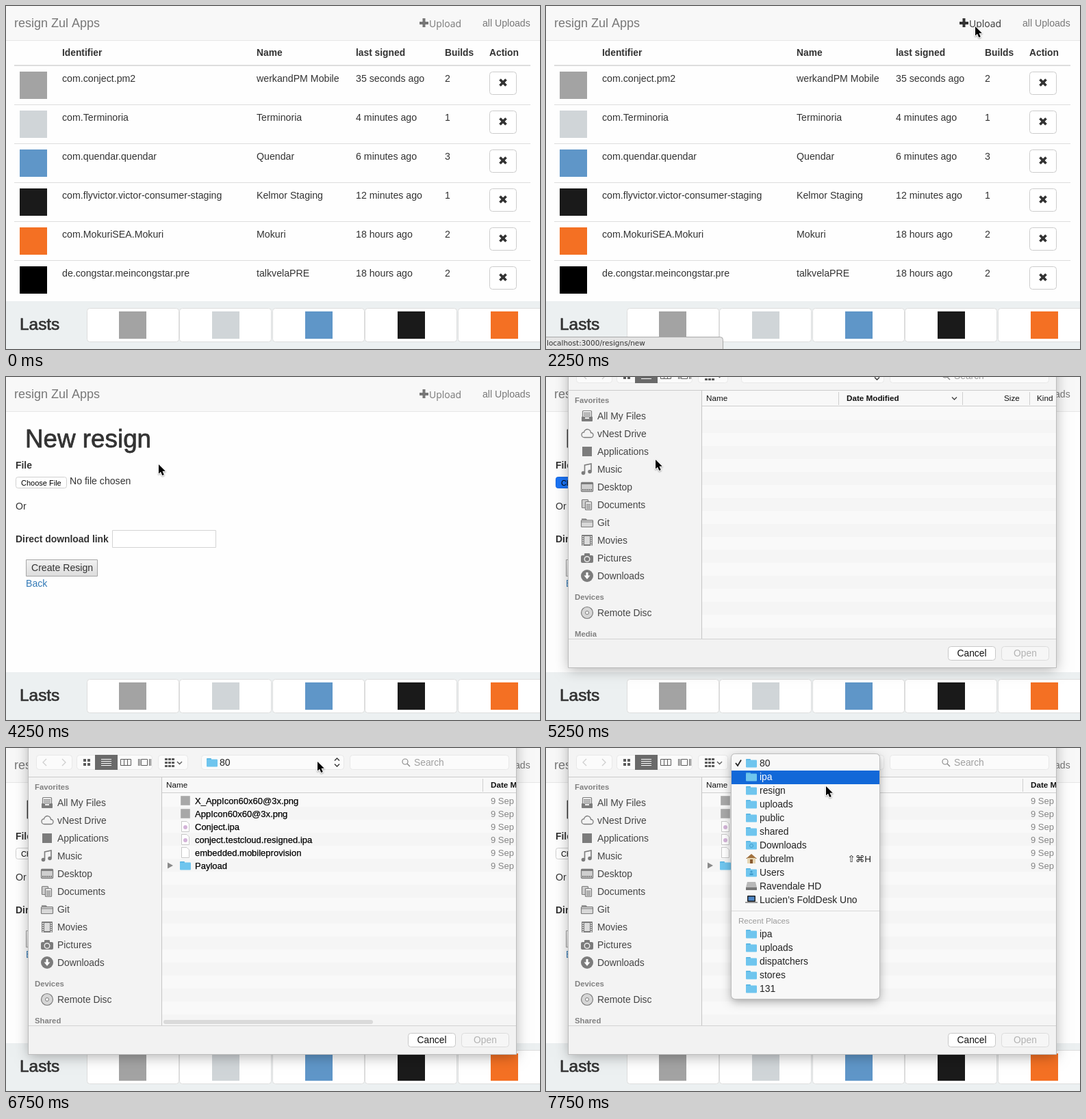
Write an HTML page with a canvas that moves like this. It is 780 by 502 pixels and loops after 8000 ms.

```html
<!DOCTYPE html>
<html lang="en">
<head>
<meta charset="utf-8">
<title>resign Zul Apps</title>
<style>
html, body { margin: 0; width: 100%; height: 100%; overflow: hidden; background: #fefefe; }
canvas { display: block; }
</style>
</head>
<body>
<canvas id="stage" width="780" height="502"></canvas>
<script>
const c = document.getElementById('stage').getContext('2d');
const LOOP = 8000, STEP = 250;
const SANS = '"Liberation Sans", Arial, sans-serif';

// ---- drawing helpers ----
function text(s, x, y, size, color, weight = 400, family = SANS, align = 'left') {
  c.font = `${weight} ${size}px ${family}`;
  c.fillStyle = color;
  c.textAlign = align;
  c.fillText(s, x, y);
}
function medium(s, x, y, size, color, extra) {
  text(s, x, y, size, color);
  c.strokeStyle = color;
  c.lineWidth = extra;
  c.lineJoin = 'round';
  c.strokeText(s, x, y);
}
function rect(x, y, w, h, color) {
  c.fillStyle = color;
  c.fillRect(x, y, w, h);
}
function box(x, y, w, h, r, fill, stroke, width = 1) {
  c.beginPath();
  c.roundRect(x, y, w, h, r);
  if (fill) { c.fillStyle = fill; c.fill(); }
  if (stroke) { c.strokeStyle = stroke; c.lineWidth = width; c.stroke(); }
}
function line(points, color, width = 1) {
  c.beginPath();
  for (let i = 0; i < points.length; i += 2) c.lineTo(points[i], points[i + 1]);
  c.strokeStyle = color;
  c.lineWidth = width;
  c.lineJoin = 'miter';
  c.stroke();
}
function poly(points, fill) {
  c.beginPath();
  for (let i = 0; i < points.length; i += 2) c.lineTo(points[i], points[i + 1]);
  c.closePath();
  c.fillStyle = fill;
  c.fill();
}
function disc(x, y, r, fill, stroke, width = 1) {
  c.beginPath();
  c.arc(x, y, r, 0, Math.PI * 2);
  if (fill) { c.fillStyle = fill; c.fill(); }
  if (stroke) { c.strokeStyle = stroke; c.lineWidth = width; c.stroke(); }
}
function shadow(color, blur, dy) {
  c.shadowColor = color;
  c.shadowBlur = blur;
  c.shadowOffsetY = dy;
}
const noShadow = () => shadow('transparent', 0, 0);

// ---- page ----
const apps = [
  ['com.conject.pm2', 'werkandPM Mobile', '35 seconds ago', '2', '#a3a3a3'],
  ['com.Terminoria', 'Terminoria', '4 minutes ago', '1', '#d0d5d8'],
  ['com.quendar.quendar', 'Quendar', '6 minutes ago', '3', '#5f96c8'],
  ['com.flyvictor.victor-consumer-staging', 'Kelmor Staging', '12 minutes ago', '1', '#1a1a1a'],
  ['com.MokuriSEA.Mokuri', 'Mokuri', '18 hours ago', '2', '#f47023'],
  ['de.congstar.meincongstar.pre', 'talkvelaPRE', '18 hours ago', '2', '#000']
];
const cols = [82, 366, 511, 641, 706];

function navbar(hover) {
  rect(0, 0, 780, 50, '#f8f8f8');
  rect(0, 50, 780, 1, '#e7e7e7');
  text('resign Zul Apps', 12, 31, 18, '#777');
  const ink = hover ? '#333' : '#777';
  rect(604, 23, 13, 4, ink);
  rect(608.5, 18, 4, 13, ink);
  text('Upload', 618, 31, 14, ink, 400, '"Open Sans", sans-serif');
  text('all Uploads', 696, 30, 14.1, '#777');
}

function table() {
  ['Identifier', 'Name', 'last signed', 'Builds', 'Action'].forEach((s, i) =>
    text(s, cols[i], 73, 13.8, '#333', 700));
  rect(12, 86, 754, 2, '#ddd');
  apps.forEach((app, i) => {
    const y = 87 + i * 57;
    if (i) rect(12, y, 754, 1, '#ddd');
    rect(20, y + 9, 40, 40, app[4]);
    for (let k = 0; k < 4; k++) text(app[k], cols[k], y + 24, 14.2, '#333');
    box(706.5, y + 9.5, 39, 33, 4, '#fff', '#ccc');
    line([721.5, y + 20.5, 730.5, y + 29.5], '#333', 3.8);
    line([730.5, y + 20.5, 721.5, y + 29.5], '#333', 3.8);
  });
}

function form(pressed) {
  medium('New resign', 28, 103, 36.8, '#333', 0.8);
  text('File', 14, 134, 13.9, '#333', 700);
  box(14.5, 146.5, 74, 16, 3, pressed ? '#1a73f5' : '#fff', pressed ? '#1667e0' : '#d0d0d0');
  text('Choose File', 22, 159, 11, '#000');
  text('No file chosen', 93, 157, 14.1, '#333');
  text('Or', 14, 194, 14.1, '#333');
  text('Direct download link', 14, 242, 13.9, '#333', 700);
  box(155.5, 224.5, 151, 25, 0, '#fff', '#d4d4d4');
  const g = c.createLinearGradient(0, 267, 0, 292);
  g.addColorStop(0, '#f2f2f2');
  g.addColorStop(1, '#dcdcdc');
  box(29.5, 267.5, 104, 24, 0, g, '#a6a6a6');
  text('Create Resign', 37, 284, 14.1, '#333');
  text('Back', 29, 307, 14.1, '#337ab7');
}

function footer() {
  rect(0, 432, 780, 70, '#ecf0f1');
  medium('Lasts', 20, 474, 24.4, '#333', 0.7);
  for (let i = 0; i < 5; i++) {
    box(118.5 + Math.floor(i * 135.5), 442.5, 134, 49, 4, '#fff', '#ddd');
    rect(165 + Math.round(i * 135.75), 447, 40, 40, apps[i][4]);
  }
}

function statusBar() {
  box(-4.5, 484.5, 263, 24, 4, '#e4e4e4', '#a8a8a8');
  text('localhost:3000/resigns/new', 1, 497, 10.5, '#333', 400, '"DejaVu Sans", sans-serif');
}

// ---- file dialog ----
const G = '#7c7c7c';

function folder(x, y, fill = '#6fc5ee', top = '#55b3e2') {
  box(x, y - 6, 7, 5, 1, top);
  box(x, y - 4.5, 16, 11, 1, fill);
}
function page(x, y) {
  poly([x + 2, y - 8, x + 10, y - 8, x + 14, y - 4, x + 14, y + 8, x + 2, y + 8], '#fff');
  line([x + 2.5, y - 7.5, x + 10, y - 7.5, x + 13.5, y - 4, x + 13.5, y + 7.5, x + 2.5, y + 7.5, x + 2.5, y - 8], '#c8c8c8');
}

// sidebar icons, centred on (60, y)
const sideIcons = {
  tray(y) {
    box(53.5, y - 7.5, 13, 10, 1, '#f3f3f3', G, 1.2);
    for (let k = -5; k < 1; k += 2) rect(55, y + k, 10, 1, G);
    box(52, y + 1, 16, 7, 1, G);
    rect(57, y + 2, 6, 2, '#f3f3f3');
  },
  cloud(y) {
    c.beginPath();
    c.arc(56, y + 1.5, 4, Math.PI / 2, Math.PI * 1.45);
    c.arc(60.5, y - 1.5, 5, Math.PI * 1.05, Math.PI * 1.85);
    c.arc(65.5, y + 2, 3.5, Math.PI * 1.5, Math.PI / 2);
    c.closePath();
    c.strokeStyle = G; c.lineWidth = 1.3; c.stroke();
  },
  square(y) { rect(53, y - 7, 14, 14, G); },
  note(y) {
    line([56.5, y + 5, 56.5, y - 6, 66, y - 8, 66, y + 3], G, 1.6);
    disc(54.5, y + 5.5, 2.8, G);
    disc(64, y + 3.5, 2.8, G);
  },
  desk(y) {
    box(51.5, y - 6.5, 17, 13, 1, '#cfcfcf', G, 1.3);
    rect(52, y - 6, 16, 2, G);
    for (let x = 53; x < 67; x += 3) rect(x, y + 3, 2, 2, G);
  },
  docs(y) {
    box(52.5, y - 7.5, 9, 12, 1, '#cfcfcf', G, 1.2);
    box(57.5, y - 4.5, 9, 12, 1, '#e4e4e4', G, 1.2);
    for (let k = -1; k < 6; k += 2) rect(59, y + k, 6, 1, G);
  },
  folder(y) {
    line([52, y - 5, 58, y - 5, 60, y - 3], G, 1.4);
    box(51.5, y - 3.5, 17, 10, 1, '#d8d8d8', G, 1.2);
    rect(52, y - 1.5, 16, 1, G);
  },
  film(y) {
    box(52, y - 8, 16, 16, 1, G);
    rect(56, y - 6, 8, 12, '#dcdcdc');
    for (let k = -6; k < 7; k += 3) { rect(53, y + k, 2, 1.5, '#eee'); rect(65, y + k, 2, 1.5, '#eee'); }
  },
  camera(y) {
    box(51, y - 4, 18, 11, 2, G);
    box(56, y - 7, 8, 5, 1, G);
    disc(60, y + 1.5, 3.8, G, '#eee', 1.4);
  },
  down(y) {
    disc(60, y, 9, G);
    rect(58.5, y - 5, 3, 5, '#fff');
    poly([55.5, y - 0.5, 64.5, y - 0.5, 60, y + 5], '#fff');
  },
  cd(y) {
    disc(60, y, 8.5, '#d6d6d6', G, 1.2);
    disc(60, y, 2.5, '#f4f4f4', G, 1);
  }
};
const places = [
  ['All My Files', 'tray'], ['vNest Drive', 'cloud'], ['Applications', 'square'], ['Music', 'note'],
  ['Desktop', 'desk'], ['Documents', 'docs'], ['Git', 'folder'], ['Movies', 'film'],
  ['Pictures', 'camera'], ['Downloads', 'down']
];
const files = ['X_AppIcon60x60@3x.png', 'AppIcon60x60@3x.png', 'Conject.ipa',
  'conject.testcloud.resigned.ipa', 'embedded.mobileprovision', 'Payload'];

function sidebar(loaded) {
  rect(33, 43, 194, 363, '#f3f3f3');
  rect(227, 43, 1, 363, '#c6c6c6');
  const head = (s, y) => text(s, 42, y + 4, 11.3, '#808080', 700);
  const item = (s, icon, y) => {
    sideIcons[icon](y);
    text(s, 75, y + 5, 13.9, '#454545');
  };
  head('Favorites', 57);
  places.forEach(([s, icon], i) => item(s, icon, 80 + i * 26));
  head('Devices', 345);
  item('Remote Disc', 'cd', 368);
  head(loaded ? 'Shared' : 'Media', 399);
}

function toolbar(loaded) {
  const ink = '#5c5c5c';
  const button = (x, w) => box(x + 0.5, 10.5, w, 21, 4, '#fbfbfb', '#e8e8e8');
  button(44, 52);
  line([59, 16, 54, 21, 59, 26], '#cfcfcf', 1.3);
  line([82, 16, 87, 21, 82, 26], '#cfcfcf', 1.3);
  button(103, 110);
  for (let i = 0; i < 4; i++) rect(113 + (i % 2) * 6, 16 + (i >> 1) * 6, 4, 4, ink);
  rect(130, 10, 33, 22, '#6a6a6a');
  for (let k = 0; k < 4; k++) rect(139, 16 + k * 3, 15, 1, '#fff');
  box(167.5, 16.5, 15, 9, 0, null, ink);
  rect(172, 17, 1, 9, ink);
  rect(177, 17, 1, 9, ink);
  box(197.5, 16.5, 9, 9, 0, null, ink);
  [193, 195, 209, 211].forEach(x => rect(x, 16, 1, 10, ink));
  button(222, 43);
  for (let i = 0; i < 9; i++) rect(232 + (i % 3) * 5, 15 + Math.floor(i / 3) * 5, 4, 3, ink);
  line([250, 20, 253.5, 23.5, 257, 20], ink, 1.4);
  button(285, 208);
  if (loaded) {
    folder(293, 21);
    text('80', 312, 26, 14, '#222');
  }
  line([480, 18.5, 483.5, 15, 487, 18.5], '#333', 1.4);
  line([480, 23.5, 483.5, 27, 487, 23.5], '#333', 1.4);
  button(502, 232);
  disc(583, 20, 4, null, '#8a8a8a', 1.2);
  line([586, 23, 590, 27], '#8a8a8a', 1.4);
  text('Search', 596, 26, 13.8, '#a0a0a0');
}

function fileList(loaded, scrollbar) {
  rect(228, 43, 517, 363, '#f9f9f9');
  for (let y = 86; y < 406; y += 38) rect(228, y, 517, Math.min(19, 406 - y), '#f5f5f5');
  rect(228, 43, 517, 23, '#f8f8f8');
  rect(228, 65, 517, 1, '#cfcfcf');
  const head = (s, x, w = 400) => text(s, x, 58, 11.7, '#111', w);
  const split = x => rect(x, 45, 1, 19, '#cfcfcf');
  head('Name', 234);
  if (!loaded) {
    head('Date Modified', 439, 700);
    line([593, 52.5, 596.5, 56, 600, 52.5], '#444', 1.4);
    head('Size', 669);
    head('Kind', 717);
    [427, 608, 706].forEach(split);
    return;
  }
  head('Date Modified', 708, 700);
  split(696);
  files.forEach((s, i) => {
    const y = 77 + i * 19;
    if (i < 2) {
      box(255.5, y - 6.5, 13, 13, 0, '#a8a8a8', '#b8b8b8');
    } else if (i < 5) {
      page(254, y);
      if (i < 4) disc(262, y + 1, 3, '#d3b3d8');
    } else {
      folder(254, y);
      poly([236, y - 4.5, 244, y, 236, y + 4.5], '#8a8a8a');
    }
    medium(s, 276, y + 5, 13, '#000', 0.25);
    text('9 Sep', 708, y + 5, 13, '#858585');
  });
  if (scrollbar) box(230, 398, 306, 6, 3, '#dadada');
}

function dialog(offset, loaded, scrollbar) {
  c.save();
  c.translate(0, offset);
  shadow('rgba(0,0,0,.3)', 18, 4);
  rect(33, -20, 712, 468, '#f2f2f2');
  noShadow();
  box(32.5, -20, 713, 468.5, 0, null, '#bcbcbc');
  c.beginPath();
  c.rect(33, -20, 712, 468);
  c.clip();
  rect(33, -20, 712, 62, '#f4f4f4');
  toolbar(loaded);
  rect(33, 42, 712, 1, '#cbcbcb');
  sidebar(loaded);
  fileList(loaded, scrollbar);
  rect(33, 406, 712, 1, '#d2d2d2');
  box(587.5, 417.5, 69, 20, 4, '#fff', '#c8c8c8');
  text('Cancel', 622, 432, 13.8, '#111', 400, SANS, 'center');
  box(665.5, 417.5, 69, 20, 4, '#f6f6f6', '#dcdcdc');
  text('Open', 700, 432, 13.8, '#b2b2b2', 400, SANS, 'center');
  c.restore();
}

// ---- path menu ----
const path = ['80', 'ipa', 'resign', 'uploads', 'public', 'shared', 'Downloads',
  'dubrelm', 'Users', 'Ravendale HD', 'Lucien’s FoldDesk Uno'];
const recent = ['ipa', 'uploads', 'dispatchers', 'stores', '131'];

function menuIcon(i, y) {
  if (i === 7) {
    poly([292, y, 300, y - 7, 308, y], '#a0713f');
    rect(294, y - 1, 12, 8, '#e6d6b4');
    rect(298, y + 1, 4, 6, '#8a5a30');
  } else if (i === 9) {
    poly([294, y - 6, 306, y - 6, 308, y + 2, 292, y + 2], '#b8b8b8');
    rect(292, y + 2, 16, 4, '#777');
  } else if (i === 10) {
    box(294, y - 6, 12, 9, 1, '#222');
    rect(295.5, y - 4.5, 9, 6, '#4d86c6');
    rect(291, y + 3, 18, 2, '#999');
  } else {
    folder(292, y);
    if (i === 6) disc(300, y + 1, 2.5, null, '#3f9ccc');
    if (i === 8) { disc(300, y - 1, 1.6, '#3f9ccc'); rect(297.5, y + 1.5, 5, 2.5, '#3f9ccc'); }
  }
}

function menu(active) {
  shadow('rgba(0,0,0,.35)', 14, 4);
  box(271, 9, 216, 358, 5, '#f8f8f8');
  noShadow();
  box(270.5, 8.5, 217, 359, 5, null, '#bdbdbd');
  rect(271, 13 + active * 20, 216, 20, '#1268d8');
  path.forEach((s, i) => {
    const y = 22 + i * 20, ink = i === active ? '#fff' : '#222';
    menuIcon(i, y);
    text(s, 312, y + 5, 13.9, ink);
    if (!i) line([277, 22, 280, 26, 285, 17.5], ink, 1.8);
  });
  text('⇧⌘H', 475, 167, 13.5, '#222', 400, '"Liberation Sans", "DejaVu Sans", sans-serif', 'right');
  rect(271, 238, 216, 1, '#d8d8d8');
  text('Recent Places', 281, 257, 11.6, '#9a9a9a');
  recent.forEach((s, i) => {
    folder(292, 272 + i * 20);
    text(s, 312, 277 + i * 20, 13.9, '#222');
  });
}

// ---- pointer ----
const track = [
  [250, 707, 20], [500, 735, 67], [750, 735, 67], [1250, 690, 46], [1750, 633, 29], [2000, 633, 29],
  [2250, 627, 30], [2500, 615, 33], [3000, 571, 41], [3500, 571, 41], [4000, 330, 100], [4250, 223, 128],
  [4500, 62, 152], [4750, 62, 152], [5250, 160, 121], [5750, 300, 105], [6000, 345, 85],
  [6750, 455, 20], [7250, 455, 20], [7750, 409, 56], [8000, 409, 56]
];

function pointer(t) {
  const i = track.findIndex(k => k[0] > t);
  if (i < 1) return;
  const [t0, x0, y0] = track[i - 1], [t1, x1, y1] = track[i];
  const p = (t - t0) / (t1 - t0);
  c.save();
  c.translate(x0 + (x1 - x0) * p, y0 + (y1 - y0) * p);
  c.beginPath();
  [[0, 0], [0, 13.5], [3, 10.8], [5.3, 16], [7.8, 15], [5.5, 9.8], [9.8, 9.8]].forEach(q => c.lineTo(...q));
  c.closePath();
  c.strokeStyle = '#fff';
  c.lineWidth = 2;
  c.lineJoin = 'round';
  shadow('rgba(0,0,0,.35)', 2, 1);
  c.stroke();
  noShadow();
  c.fillStyle = '#000';
  c.fill();
  c.restore();
}

function draw(t) {
  const onForm = t >= 3750;
  rect(0, 0, 780, 502, '#fefefe');
  navbar(t >= 1500 && !onForm);
  if (onForm) form(t >= 4750 && t < 5500);
  else table();
  footer();
  if (t >= 1500 && t < 3500) statusBar();
  if (t > 4750) {
    const left = Math.max(0, 1 - (t - 4750) / 750);
    dialog(-Math.round(448 * left ** 2.7), t >= 5500, t < 7000);
  }
  if (t >= 7250) menu(t < 7500 ? 0 : 1);
  pointer(t);
}

const start = performance.now();
function tick(now) {
  const t = Math.max(0, now - start) % LOOP;
  draw(Math.floor(t / STEP) * STEP);
  requestAnimationFrame(tick);
}
draw(0);
requestAnimationFrame(tick);
</script>
</body>
</html>
```
